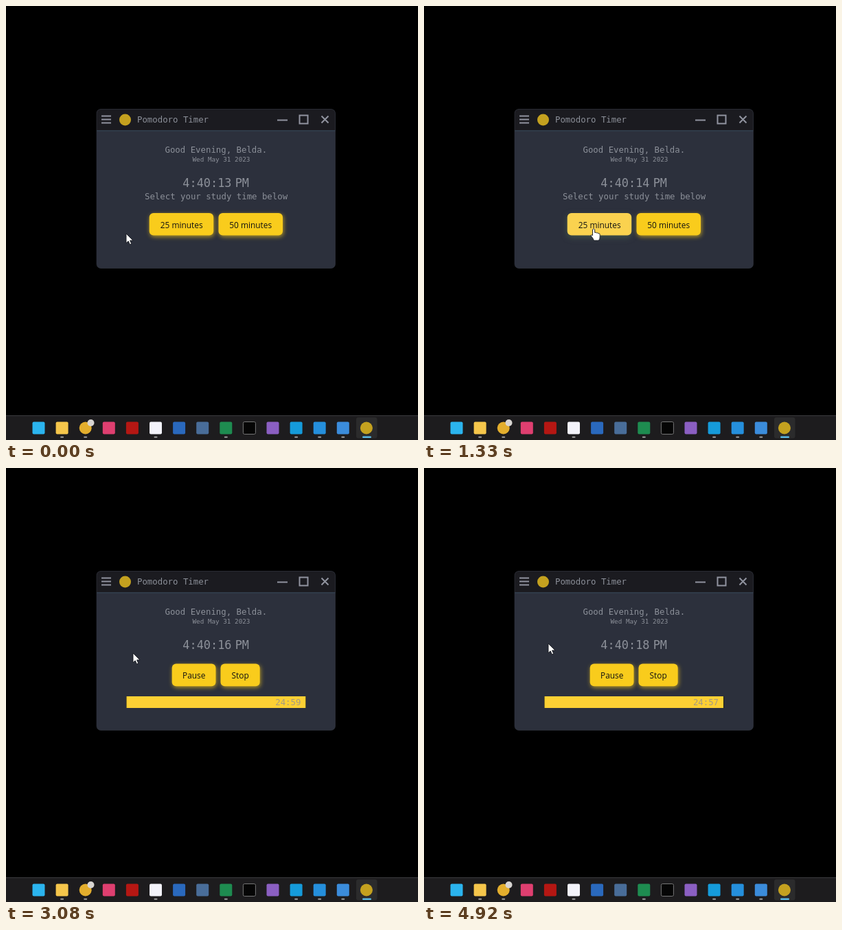
An HTML page that plays this animation: 600 by 633 pixels, repeating every 5010 ms.

```html
<!DOCTYPE html>
<html lang="en">
<head>
<meta charset="utf-8">
<title>Pomodoro Timer</title>
<style>
  html, body { margin: 0; width: 100%; height: 100%; overflow: hidden; background: #000; }
  #stage { display: block; width: 600px; height: 633px; }
  text { font: 12.35px "DejaVu Sans Mono", "Noto Sans Mono", monospace; fill: #8c9099; white-space: pre; }
  .date { font-size: 9.3px; }
  .clock { font-size: 16.9px; }
  .lines { fill: none; stroke: #9194a0; stroke-width: 2; }
  .button rect { fill: #f9cc1c; filter: drop-shadow(1.5px 2.5px 3px rgba(249, 204, 28, .65)); }
  .button.hover rect { fill: #fad24f; filter: drop-shadow(0 3px 4px rgba(82, 112, 84, .55)); }
  .button text { font: 500 11.9px "Open Sans", "Noto Sans", sans-serif; fill: #111; text-anchor: middle; }
  #left { fill: #a39a84; text-anchor: end; }
  .cursor { fill: #fff; stroke: #15171d; stroke-width: .9; stroke-linejoin: round; }
</style>
</head>
<body>
<svg id="stage" viewBox="0 0 600 633">
  <rect width="600" height="633"/>

  <rect x="132" y="150.5" width="347.5" height="232" rx="6" fill="#2c303c"/>
  <path d="M132 182V156.5a6 6 0 0 1 6-6H473.5a6 6 0 0 1 6 6V182z" fill="#1b1b20"/>
  <path d="M132 182H479.5" stroke="#303a48" stroke-width="2"/>
  <rect x="132" y="150.5" width="347.5" height="232" rx="6" fill="none" stroke="#343842" stroke-width=".6"/>
  <path class="lines" d="M139 160.5h14m-14 5h14m-14 5h14M395 166.5h15M427.5 159.5h12v12h-12zM459.5 160.5l10 10m0-10l-10 10"/>
  <circle cx="173.5" cy="166" r="8.5" fill="#c4a11f"/>
  <text x="191" y="170">Pomodoro Timer</text>

  <text x="231.5" y="214">Good Evening, Belda.</text>
  <text class="date" x="271.5" y="227">Wed May 31 2023</text>
  <text class="clock" id="clock" x="257.3" y="263.5"></text>
  <text class="clock" x="333.7" y="263.5">PM</text>

  <g id="choose">
    <text x="202" y="282">Select your study time below</text>
    <g class="button" id="short"><rect x="208.7" y="302" width="93.5" height="32.6" rx="6"/><text x="255.7" y="323.5">25 minutes</text></g>
    <g class="button"><rect x="309.5" y="302" width="93.5" height="32.6" rx="6"/><text x="356.2" y="323.5">50 minutes</text></g>
  </g>

  <g id="running">
    <g class="button"><rect x="241.7" y="285.6" width="63.8" height="32.6" rx="6"/><text x="273.7" y="307">Pause</text></g>
    <g class="button"><rect x="312.5" y="285.6" width="57.2" height="32.6" rx="6"/><text x="341.2" y="307">Stop</text></g>
    <rect x="175.3" y="333" width="261.5" height="17" fill="#0d0d0b"/>
    <svg id="bar" x="175.3" y="333" height="17">
      <rect width="100%" height="17" fill="#fdd034"/>
      <text id="left" y="13"></text>
    </svg>
  </g>

  <g id="taskbar">
    <rect y="597" width="600" height="36" fill="#1d1c1e"/>
    <path d="M0 597.5H600" stroke="#3c3c3e"/>
    <rect x="510" y="600" width="30.5" height="30.5" rx="3" fill="#2b2b2c"/>
    <rect x="519" y="627.5" width="13" height="2.5" rx="1.2" fill="#5bb9e4"/>
  </g>

  <path class="cursor" id="arrow" d="M0 0V13.800L3.200 10.900L5.400 15.800L7.700 14.800L5.600 10H10z"/>
  <path class="cursor" id="hand" d="M-3.500 1q1.600-2.400 3.200 0V5.500q1.600-1 2.700.5q1.500-.8 2.500.7q1.900-.4 2.300 1.500V12q0 2.500-1.700 5H-1.600Q-2.500 14-5.600 10.500q-.5-2 1.200-1.700l.9 1z"/>
</svg>
<script>
const LOOP = 5010, CLICK = 1365, BAR = 261.5;
const $ = id => document.getElementById(id);

// Taskbar: colour, shape (s square, c circle), d for a running-app dot
const apps = ['#2bb4ee s', '#f5c64b s d', '#e3ae2d c d', '#df3f70 s', '#b51713 s', '#f3f3fa s d',
  '#2a69bd s', '#496d99 s', '#1e8c50 s d', '#050505 s', '#8b5fc2 s', '#159bda s d',
  '#258fdc s d', '#3b8cdb s d', '#c4a11f c'];

function add(name, attrs) {
  const el = document.createElementNS('http://www.w3.org/2000/svg', name);
  for (const key in attrs) el.setAttribute(key, attrs[key]);
  $('taskbar').append(el);
}

apps.forEach((app, i) => {
  const [fill, shape, dot] = app.split(' ');
  const x = 47.5 + i * 34.1;
  const stroke = fill === '#050505' ? '#777' : 'none';
  if (shape === 'c') add('circle', { cx: x, cy: 615.5, r: 9, fill });
  else add('rect', { x: x - 9, y: 606.5, width: 18, height: 18, rx: 2, fill, stroke });
  if (dot) add('rect', { x: x - 2.5, y: 627.8, width: 5, height: 2, rx: 1, fill: '#9a9a9a' });
});
add('circle', { cx: 123.5, cy: 608, r: 5, fill: '#d8d5d2' });

// Pointer stops: time, x, y
const stops = [[0, 175, 332], [100, 175, 332], [800, 243, 335], [1250, 249, 325], [1650, 249, 325],
  [2300, 230, 319], [2400, 230, 319], [3080, 185, 270], [3450, 181, 256], [LOOP, 181, 256]];

function pointerAt(t) {
  const i = stops.findIndex(stop => stop[0] > t);
  const [t0, x0, y0] = stops[i - 1], [t1, x1, y1] = stops[i];
  const p = (t - t0) / (t1 - t0), k = p * p * (3 - 2 * p);
  return [x0 + (x1 - x0) * k, y0 + (y1 - y0) * k];
}

const show = (id, on) => $(id).style.display = on ? '' : 'none';

function draw(now) {
  const t = now % LOOP;
  const running = t >= CLICK;
  const [x, y] = pointerAt(t);
  const hover = x > 209 && !running;
  const hand = hover || running && t < 1700;

  $('clock').textContent = '4:40:' + (13 + Math.floor((t + 300) / 1000));
  show('choose', !running);
  show('running', running);
  $('short').classList.toggle('hover', hover);

  if (running) {
    const seconds = 1500 - Math.max(0, Math.floor((t - 1400) / 1000));
    const p = Math.min(1, (t - CLICK) / 500);
    const width = BAR * seconds / 1500 * (1 - (1 - p) ** 2.3);
    $('bar').setAttribute('width', width);
    $('left').setAttribute('x', width - 7.2);
    $('left').textContent = Math.floor(seconds / 60) + ':' + String(seconds % 60).padStart(2, '0');
  }

  show('arrow', !hand);
  show('hand', hand);
  $(hand ? 'hand' : 'arrow').setAttribute('transform', `translate(${x} ${y})`);
}

const start = performance.now();
function tick() {
  draw(performance.now() - start);
  requestAnimationFrame(tick);
}
tick();
</script>
</body>
</html>
```
